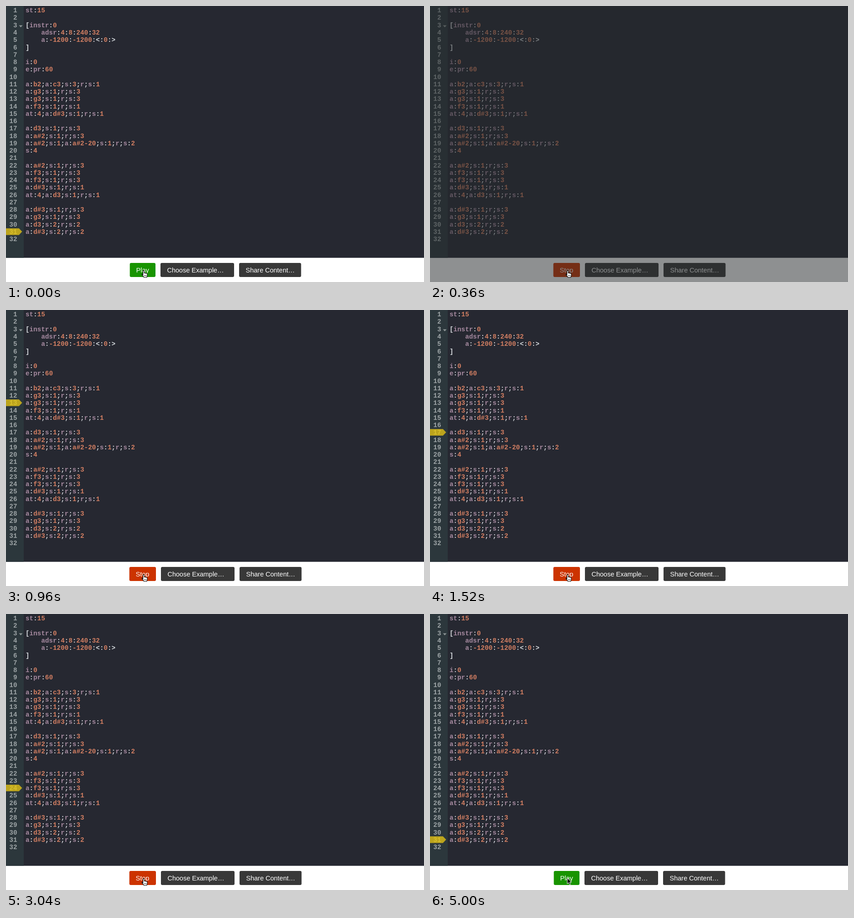
An HTML page that plays this animation: 920x608 px, repeating every 5.08 s.

```html
<!DOCTYPE html>
<html lang="en">
<head>
<meta charset="utf-8">
<title>Music code editor</title>
<style>
  html, body { margin: 0; width: 100%; height: 100%; overflow: hidden; background: #fff; }
  svg { display: block; width: 920px; height: 608px; }
  .code { font: bold 14.33px "Liberation Mono", "Courier New", monospace; }
  .code text { white-space: pre; }
  .num { fill: #9da4a6; text-anchor: end; }
  .word { fill: #a5899f; }
  .value { fill: #d17e62; }
  .sign { fill: #d5d9dd; }
  .bar { font: 14.5px "Liberation Sans", Arial, sans-serif; fill: #fff; }
  .dark { fill: #383838; }
</style>
</head>
<body>
<svg viewBox="0 0 920 608">
  <rect width="920" height="608" fill="#fff"/>
  <rect width="920" height="554.7" fill="#262831"/>
  <rect width="39" height="554.7" fill="#2c373c"/>
  <g id="code" class="code"></g>
  <path d="M28.5 42.5h8l-4 4.5z" fill="#8d9596"/>
  <g id="marker">
    <path d="M0-8H28.5L35.5-.7 28.5 6.6H0z" fill="#bca41d"/>
    <text id="markerNum" class="code" x="24.5" y="4.2" text-anchor="end" fill="#d8c02c"></text>
  </g>
  <g class="bar">
    <rect id="toggle" y="566" height="31" rx="3"/>
    <text id="label" y="587"></text>
    <g id="others">
      <rect class="dark" x="340" y="566" width="162" height="31" rx="3"/>
      <text x="354.5" y="587">Choose Example…</text>
      <rect class="dark" x="513" y="566" width="136.5" height="31" rx="3"/>
      <text x="527.5" y="587">Share Content…</text>
    </g>
  </g>
  <rect id="veil" width="920" height="608" fill="#262a2b"/>
  <path id="arrow" d="M302 581.5v13l3-2.8 2.2 4.8 2.3-1-2.1-4.7h4.2z" fill="#000" stroke="#fff" stroke-width="1"/>
  <g id="hand" stroke="#000" stroke-width="1.1" stroke-linejoin="round">
    <path fill="#fff" d="M301.5 592.5v-8.2c0-2.2 2.7-2.2 2.7 0v4.2c.3-1.2 2.3-1 2.4.4.4-1 2.2-.8 2.3.5.5-.8 2.1-.5 2.1 1v3.3c0 1.7-1.2 2.3-1.2 4h-6.5c-.7-2.2-2.7-3.7-4-5.8-1-1.6.8-2.4 2.2.6z"/>
    <path d="M304.2 592.5v2.7m2.1-2.7v2.7m2.1-2.7v2.7" stroke-width=".8"/>
  </g>
</svg>
<script>
const LOOP = 5080, LINE = 16.26, UNIT = 61;
const FADE = { start: 80, peak: 280, end: 480, alpha: 0.87 };
const MUSIC_START = 460, PLAY_START = 200, PLAY_END = 4400, HOVER = 640;

const source = `st:15

[instr:0
    adsr:4:8:240:32
    a:-1200:-1200:<:0:>
]

i:0
e:pr:60

a:b2;a:c3;s:3;r;s:1
a:g3;s:1;r;s:3
a:g3;s:1;r;s:3
a:f3;s:1;r;s:1
at:4;a:d#3;s:1;r;s:1

a:d3;s:1;r;s:3
a:a#2;s:1;r;s:3
a:a#2;s:1;a:a#2-20;s:1;r;s:2
s:4

a:a#2;s:1;r;s:3
a:f3;s:1;r;s:3
a:f3;s:1;r;s:3
a:d#3;s:1;r;s:1
at:4;a:d3;s:1;r;s:1

a:d#3;s:1;r;s:3
a:g3;s:1;r;s:3
a:d3;s:2;r;s:2
a:d#3;s:2;r;s:2
`.split("\n");

const $ = id => document.getElementById(id);
const show = (id, on) => $(id).style.display = on ? "" : "none";
const middle = line => 10 + (line - 1) * LINE;

function add(parent, tag, attrs, text = "") {
  const el = document.createElementNS("http://www.w3.org/2000/svg", tag);
  for (const name in attrs) el.setAttribute(name, attrs[name]);
  el.textContent = text;
  return parent.appendChild(el);
}

function tokenClass(token) {
  if (/\d/.test(token)) return "value";
  return /[a-z]/.test(token) ? "word" : "sign";
}

// Each line lasts as long as its s:n waits add up to.
const cues = [];
let clock = MUSIC_START;

source.forEach((text, i) => {
  const line = i + 1, y = middle(line) + 4.2;
  add($("code"), "text", { class: "num", x: 24.5, y }, line);
  const row = add($("code"), "text", { x: 43, y });
  for (const token of text.match(/[a-z\d#-]+|[^a-z\d#-]+/g) || [])
    add(row, "tspan", { class: tokenClass(token) }, token);

  const waits = text.match(/\bs:\d/g);
  if (waits) {
    cues.push({ line, at: clock });
    clock += UNIT * waits.reduce((sum, w) => sum + Number(w[2]), 0);
  }
});

function markedLine(t) {
  if (t < FADE.start) return cues[cues.length - 1].line;
  const past = cues.filter(cue => cue.at <= t);
  return past.length ? past[past.length - 1].line : 0;
}

function veilAlpha(t) {
  const rise = (t - FADE.start) / (FADE.peak - FADE.start);
  const fall = (FADE.end - t) / (FADE.end - FADE.peak);
  return FADE.alpha * Math.max(0, Math.min(rise, fall));
}

function setButton(playing) {
  $("toggle").setAttribute("x", playing ? 271.5 : 272.5);
  $("toggle").setAttribute("width", playing ? 58.5 : 56.5);
  $("toggle").setAttribute("fill", playing ? "#cc3300" : "#189400");
  $("label").setAttribute("x", playing ? 285.5 : 286.5);
  $("label").textContent = playing ? "Stop" : "Play";
  $("others").setAttribute("transform", `translate(${playing ? 1 : 0})`);
}

function draw(now) {
  const t = now % LOOP;
  const line = markedLine(t);
  show("marker", line);
  if (line) {
    $("marker").setAttribute("transform", `translate(0 ${middle(line)})`);
    $("markerNum").textContent = line;
  }
  setButton(t >= PLAY_START && t < PLAY_END);
  $("veil").setAttribute("opacity", veilAlpha(t));

  const pointing = t < FADE.end || (t >= HOVER && t < PLAY_END);
  show("hand", pointing);
  show("arrow", !pointing);
}

function tick(now) {
  draw(now);
  requestAnimationFrame(tick);
}
draw(0);
requestAnimationFrame(tick);
</script>
</body>
</html>
```
